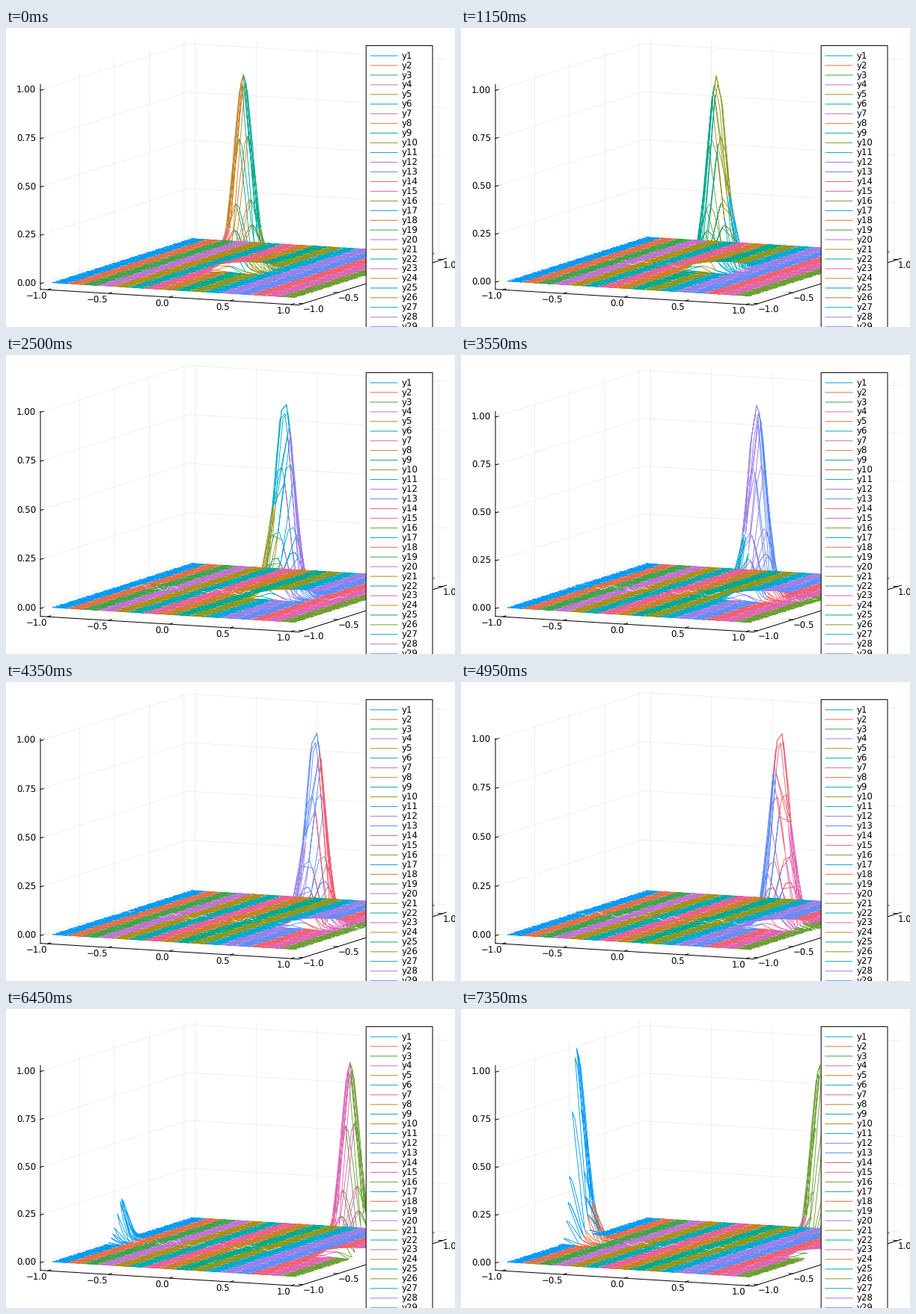
A matplotlib script that plays this animation: 600 by 400 pixels, repeating every 7400 ms.

```python
import numpy as np
import matplotlib.pyplot as plt
from matplotlib.animation import FuncAnimation
from matplotlib.collections import LineCollection
from matplotlib.patches import Rectangle

W, H, DPI = 600, 400, 100
FRAMES, INTERVAL = 148, 50
PX = 72 / DPI
FONT = dict(family="DejaVu Sans", size=11.7 * PX, color="black")
PALETTE = ["#009AFA", "#E36F47", "#3DA44D", "#C371D2", "#AC8E18", "#00AAAE",
           "#ED5E93", "#C68225", "#00A98D", "#8E971E", "#00A9CC", "#9B7FE9",
           "#618DF6", "#F06073", "#DD65B6", "#6C9F33"]
plt.rcParams["text.hinting"] = "none"

# Projection: screen vectors of the box edges
LIM = 1.06
ORIGIN = np.array([46.0, 349.6])
XV = np.array([345, 21]) / (2 * LIM)
YV = np.array([197.5, -62.5]) / (2 * LIM)
HEIGHT = 274.0


def project(x, y, up=0.0):
    """Screen position; up is the fraction of the box height."""
    x, y, up = np.broadcast_arrays(x, y, up)
    px = ORIGIN[0] + (x + LIM) * XV[0] + (y + LIM) * YV[0]
    py = ORIGIN[1] + (x + LIM) * XV[1] + (y + LIM) * YV[1] - HEIGHT * up
    return np.stack([px, py], axis=-1)


# Spectral elements: 16 x 16 cells with five Lobatto nodes each way
CELLS = 16
CELL = 2 / CELLS
r = np.array([-1, -np.sqrt(3 / 7), 0, np.sqrt(3 / 7), 1])
END_WEIGHT = 0.1
nodes = -1 + CELL * (np.arange(CELLS)[:, None] + (r + 1) / 2)


def diff_matrix(p):
    gap = p[:, None] - p[None, :] + np.eye(len(p))
    bary = 1 / gap.prod(axis=1)
    d = bary[None, :] / bary[:, None] / gap
    np.fill_diagonal(d, 0)
    np.fill_diagonal(d, -d.sum(axis=1))
    return d


DIFF = diff_matrix(r)


def rate(f):
    """Advection to the right, central flux, periodic ends."""
    out = f @ DIFF.T
    right = (np.roll(f[:, 0], -1) - f[:, -1]) / 2
    left = (np.roll(f[:, -1], 1) - f[:, 0]) / 2
    out[:, -1] += right / END_WEIGHT
    out[:, 0] -= left / END_WEIGHT
    return -2 / CELL * out


def solve(times, substeps=8):
    f = np.exp(-100 * nodes ** 2)
    states = [f]
    for span in np.diff(times):
        dt = span / substeps
        for _ in range(substeps):
            a = rate(f)
            b = rate(f + dt / 2 * a)
            c = rate(f + dt / 2 * b)
            d = rate(f + dt * c)
            f = f + dt / 6 * (a + 2 * b + 2 * c + d)
        states.append(f)
    return states


# The first time step is shorter than the rest
SHORT = 0.7
times = np.maximum(0, np.arange(FRAMES) - SHORT) / (FRAMES - 1 - SHORT)
profiles = solve(times)
across = np.exp(-100 * nodes ** 2)

# Axis order: cell row, cell column, node row, node column
X = nodes[None, :, None, :]
Y = nodes[:, None, :, None]

fig = plt.figure(figsize=(W / DPI, H / DPI), dpi=DPI, facecolor="white")
ax = fig.add_axes([0, 0, 1, 1])
ax.set_xlim(0, W)
ax.set_ylim(H, 0)
ax.axis("off")


def stroke(points, color="black", width=1.0, z=2, **kw):
    points = np.asarray(points)
    return ax.plot(points[:, 0], points[:, 1], color=color, lw=width * PX,
                   zorder=z, snap=False, **kw)[0]


def grid(points):
    return stroke(points, width=0.5, z=1, alpha=0.12)


def label(x, y, text, ha, z=3):
    return ax.text(x, y, text, ha=ha, va="baseline", zorder=z, **FONT)


def number(v, digits):
    return f"{v:.{digits}f}".replace("-", "\u2212")


def tick(p, direction):
    return stroke([p, p + np.array(direction)])


for v in np.linspace(-1, 1, 5):
    grid(project([v, v, v], [-LIM, LIM, LIM], [0, 0, 1]))
    grid(project([LIM, -LIM, -LIM], [v, v, v], [0, 0, 1]))
    p = project(v, -LIM)
    tick(p, (4, -1.3))
    label(p[0] - 0.5, p[1] + 12.5, number(v, 1), "right")
    p = project(LIM, v)
    tick(p, (-5, -0.3))
    label(p[0] + 0.5, p[1] + 11.5, number(v, 1), "left")

stroke(project([-LIM, LIM, LIM], [-LIM, -LIM, LIM]))
stroke(project([-LIM, -LIM], [-LIM, -LIM], [0, 1]))

levels = np.linspace(0, 1, 5)
level_grid = [grid(np.zeros((3, 2))) for _ in levels]
level_tick = [stroke(np.zeros((2, 2))) for _ in levels]
level_text = [label(40, 0, number(v, 2), "right") for v in levels]

surface = LineCollection([], colors=PALETTE, linewidths=0.9 * PX, zorder=4,
                         joinstyle="round")
ax.add_collection(surface, autolim=False)

# Legend runs off the bottom of the stage
ax.add_patch(Rectangle((481.2, 23.6), 88.8, 400, facecolor="white",
                       edgecolor="black", lw=PX, zorder=5, snap=False))
for k in range(29):
    y = 37.1 + 12.95 * k
    stroke([(487, y), (523, y)], PALETTE[k % 16], z=6)
    label(529, y + 4, f"y{k + 1}", "left", z=6)


def update(i):
    u = profiles[i][None, :, None, :] * across[:, None, :, None]
    lo, hi = u.min(), u.max()
    pad = 0.03 * (hi - lo)
    lo, hi = lo - pad, hi + pad
    surface.set_segments(project(X, Y, (u - lo) / (hi - lo))
                         .reshape(CELLS * CELLS, -1, 2))
    for v, g, t, s in zip(levels, level_grid, level_tick, level_text):
        up = (v - lo) / (hi - lo)
        shown = up <= 1.0005
        for part in (g, t, s):
            part.set_visible(shown)
        pts = project([-LIM, -LIM, LIM], [-LIM, LIM, LIM], up)
        g.set_data(pts[:, 0], pts[:, 1])
        x0, y0 = pts[0]
        t.set_data([x0, x0 + 4], [y0, y0 - 1])
        s.set_y(y0 + 3.9)
    return [surface, *level_grid, *level_tick, *level_text]


anim = FuncAnimation(fig, update, frames=FRAMES, interval=INTERVAL,
                     repeat=True, repeat_delay=0, blit=False)
plt.show()
```
